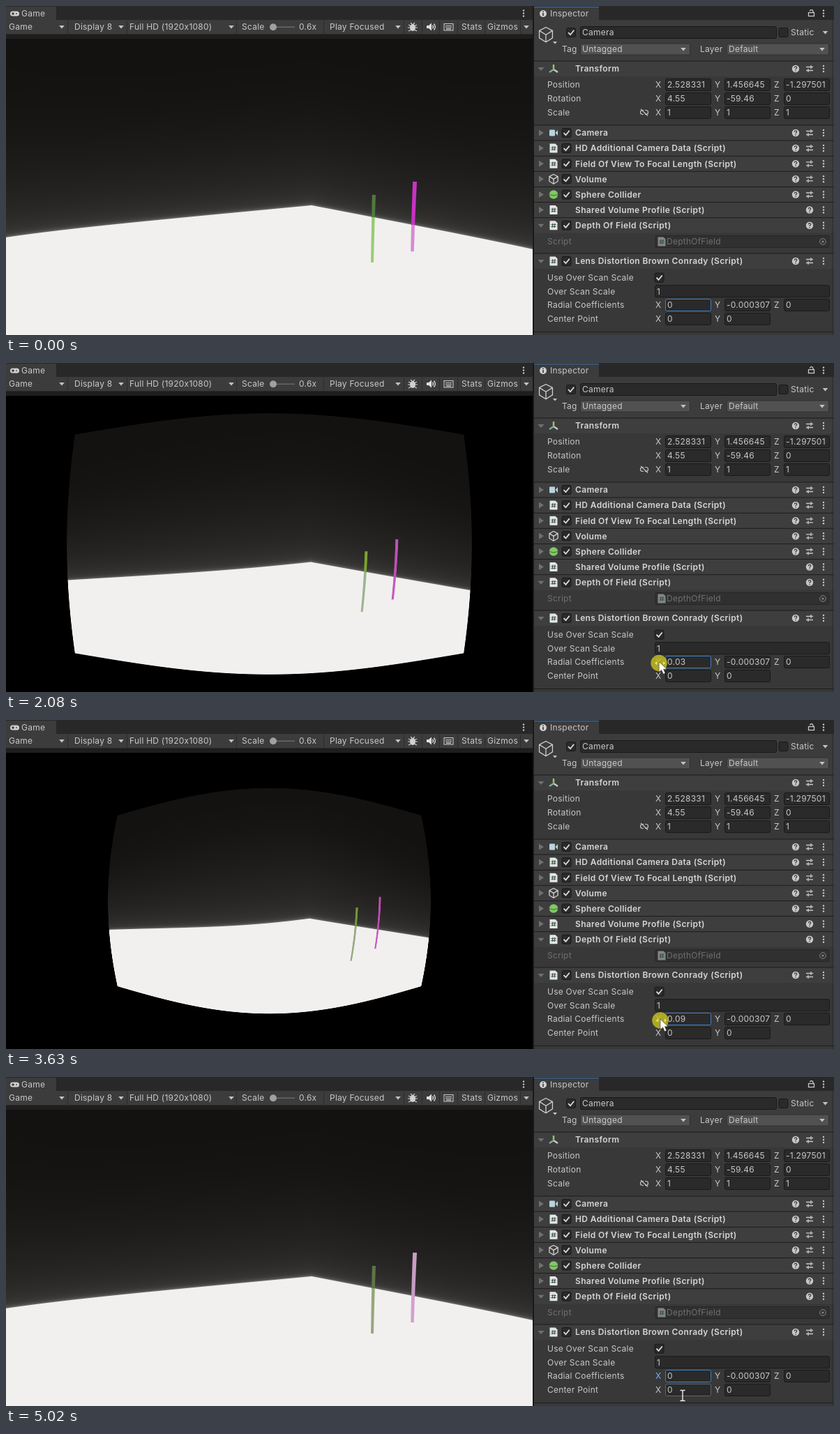
These frames come from a looping animation (1187 by 472 pixels, 5090 ms). An HTML page with a canvas:

```html
<!DOCTYPE html>
<html lang="en">
<head>
<meta charset="utf-8">
<title>Lens distortion inspector</title>
<style>
html, body { margin: 0; width: 100%; height: 100%; overflow: hidden; background: #383838; }
canvas, #ui { position: absolute; left: 0; top: 0; }
canvas { top: 47px; }
text { font: 12px Inter, sans-serif; letter-spacing: .24px; fill: #c8c8c8; white-space: pre; }
.bold { font-weight: 600; letter-spacing: .36px; fill: #d6d6d6; }
.dim { fill: #707070; }
</style>
</head>
<body>
<canvas id="view" width="755" height="425"></canvas>
<svg id="ui" width="1187" height="472"></svg>
<script>
const ui = document.getElementById('ui');
const view = document.getElementById('view').getContext('2d');
const parts = [];
const add = s => parts.push(s);

const rect = (x, y, w, h, fill, extra = '') =>
  add(`<rect x="${x}" y="${y}" width="${w}" height="${h}" fill="${fill}" ${extra}/>`);
const path = (d, stroke = '#c4c4c4', width = 1.2, fill = 'none') =>
  add(`<path d="${d}" stroke="${stroke}" stroke-width="${width}" fill="${fill}"/>`);
const disc = (x, y, r, fill, extra = '') =>
  add(`<circle cx="${x}" cy="${y}" r="${r}" fill="${fill}" ${extra}/>`);
const text = (x, y, s, cls = '', id = '') =>
  add(`<text x="${x}" y="${y + 4.4}" class="${cls}" id="${id}">${s}</text>`);
const down = (x, y, c = '#c4c4c4', r = 3.8) =>
  path(`M${x - r} ${y - 2}h${2 * r}l${-r} ${r + .6}z`, 'none', 0, c);
const right = (x, y) => path(`M${x - 3} ${y - 4.5}l7 4.5l-7 4.5z`, 'none', 0, '#707070');
const kebab = (x, y) => [-4, 0, 4].forEach(d => disc(x, y + d, 1.2, '#c8c8c8'));

function field(x, y, w, value, id = '') {
  rect(x + .5, y - 8.5, w - 1, 17, '#2a2a2a', `rx="2" stroke="#191919" id="${id}"`);
  add(`<svg x="${x}" y="${y - 9}" width="${w - 1}" height="18">`);
  text(3, 9, value, '', id && id + 'Text');
  add('</svg>');
}
function vector(y, label, values, ids = []) {
  text(776, y, label);
  values.forEach((v, i) => {
    text(931 + 85 * i, y, 'XYZ'[i], '', ids[i] ? ids[i] + 'Label' : '');
    field(945 + 85 * i, y, 66, v, ids[i]);
  });
}
function check(x, y, on = true) {
  rect(x - 6.5, y - 6.5, 13, 13, '#2a2a2a', 'rx="2" stroke="#191919"');
  if (on) path(`M${x - 4} ${y}l3 3.2l5.2 -6.4`, '#dedede', 1.8);
}
function dropdown(x, y, w, label) {
  rect(x + .5, y - 8, w, 16, '#515151', 'rx="2" stroke="#303030"');
  text(x + 3, y, label);
  down(x + w - 9, y);
}
function cube(x, y, r) {
  const h = r * .55;
  path(`M${x} ${y - r}l${r * .9} ${h * .85}v${r}l${-r * .9} ${h}l${-r * .9} ${-h}v${-r}z` +
    `M${x - r * .9} ${y - r + h * .85}l${r * .9} ${h}l${r * .9} ${-h}M${x} ${y - r + h * 1.85}v${r}`, '#d0d0d0', 1.3);
}
function script(x, y, fill = '#e6e6e6') {
  path(`M${x - 5.5} ${y - 6.5}h8l3 3v10h-11z`, 'none', 0, fill);
  path(`M${x - 1} ${y - 3}l-1 6.5M${x + 2} ${y - 3}l-1 6.5M${x - 3.5} ${y - 1}h7M${x - 3.5} ${y + 1.8}h7`, '#31533a', 1);
}
const icons = {
  script,
  axes(x, y) {
    path(`M${x} ${y - 6}v6`, '#8fd05c', 2.4);
    path(`M${x} ${y + 1}l-6 4`, '#7fae9c', 2.2);
    path(`M${x} ${y + 1}l6 4`, '#c8c8c8', 2.2);
  },
  camera(x, y) {
    rect(x - 6, y - 4.5, 8, 9, '#b9d3dc', 'rx="1"');
    path(`M${x + 2.5} ${y}l3.5 -4v8z`, 'none', 0, '#b9d3dc');
  },
  volume(x, y) { cube(x, y, 6.8); },
  ball(x, y) {
    disc(x, y, 6.2, '#82c866');
    path(`M${x - 6} ${y}q6 3 12 0`, '#3c6a2e', 1);
  }
};
function help(x, y) {
  disc(x, y, 5.2, '#c8c8c8');
  path(`M${x - 1.8} ${y - 1.3}q.2 -1.8 1.9 -1.8q1.8 .2 1.7 1.7q-.2 1 -1.7 1.6v1M${x} ${y + 2.3}v1.4`, '#3a3a3a', 1.2);
}
function header(y, icon, title, { open, box = true, sliders = true } = {}) {
  rect(757, y - 11, 430, 22, '#3e3e3e');
  rect(757, y - 11.5, 430, 1, '#1c1c1c');
  open ? down(767, y, '#707070', 4.5) : right(767, y);
  icons[icon](785, y);
  if (box) check(803.5, y);
  text(816, y, title, 'bold');
  help(sliders ? 1132 : 1152, y);
  if (sliders) path(`M1147 ${y - 2.5}h10M1147 ${y + 2.5}h10M1154 ${y - 5}v5M1150 ${y}v5`, '#c8c8c8', 1.3);
  kebab(1172, y);
}

function gameBar() {
  rect(0, 0, 755, 47, '#282828');
  rect(0, 1, 72, 20, '#3c3c3c');
  rect(0, 20, 755, 20.5, '#3c3c3c');
  rect(0, 40.5, 755, 6.5, '#1e1e1e');
  rect(6, 7.5, 13, 7, '#d0d0d0', 'rx="3.5"');
  path('M8 11h4M10 9v4M15 10v2', '#3c3c3c', 1.3);
  text(22, 11, 'Game');
  kebab(742, 10.5);
  for (const x of [88, 173, 330, 455, 570, 596, 621, 647, 686, 737]) rect(x, 21, 1, 19, '#2c2c2c');
  [[4, 'Game'], [98, 'Display 8'], [177, 'Full HD (1920x1080)'], [338, 'Scale'], [420, '0.6x'],
   [464, 'Play Focused'], [653, 'Stats'], [690, 'Gizmos']].forEach(([x, s]) => text(x, 30, s));
  [80, 165, 323, 562, 746].forEach(x => down(x, 30));
  rect(382, 29.5, 32, 1.5, '#686868');
  disc(383, 30.3, 5, '#a0a0a0');
  add('<ellipse cx="583" cy="31" rx="4" ry="5" fill="#d0d0d0"/>');
  path('M577 27l4 2M589 27l-4 2M576 31h14M577 36l4 -2M589 36l-4 -2M580 24l3 3l3 -3', '#d0d0d0', 1.2);
  path('M603 28h3l4 -3.5v11l-4 -3.5h-3z', 'none', 0, '#e0e0e0');
  path('M611.5 27.5q2 2.5 0 5M613.5 25.5q3.6 4.5 0 9', '#e0e0e0', 1.3);
  rect(628, 25.5, 13, 9.5, 'none', 'stroke="#d0d0d0"');
  path('M630 28.5h9M630 31h9M631 33.2h7', '#d0d0d0', 1.2);
  rect(755, 0, 2, 472, '#191919');
}

function inspector() {
  rect(757, 0, 430, 472, '#383838');
  rect(757, 0, 430, 20, '#282828');
  rect(757, 1, 93, 20, '#3c3c3c');
  rect(757, 1, 93, 1, '#3a72b0');
  rect(757, 20, 430, 58, '#3c3c3c');
  disc(770, 11, 5, '#d0d0d0');
  path('M770 7.4v1.6M770 10v4', '#333', 1.6);
  text(780, 11, 'Inspector');
  rect(1150.5, 9.5, 8, 5, 'none', 'stroke="#c8c8c8" stroke-width="1.3"');
  path('M1157 9v-1.5q-.3 -2 -2.3 -2t-2.3 2', '#c8c8c8', 1.3);
  kebab(1172, 10.5);

  cube(774, 41, 10.5);
  down(787, 53, '#c4c4c4', 3);
  check(810, 38);
  field(823, 38, 282, 'Camera');
  check(1114.5, 38, false);
  text(1125, 38, 'Static');
  down(1174.5, 38);
  text(797, 62, 'Tag');
  dropdown(823, 62, 157, 'Untagged');
  text(995, 62, 'Layer');
  dropdown(1033, 62, 146, 'Default');

  header(90, 'axes', 'Transform', { open: true, box: false });
  vector(113, 'Position', ['2.528331', '1.456645', '-1.297501']);
  vector(133, 'Rotation', ['4.55', '-59.46', '0']);
  vector(153, 'Scale', ['1', '1', '1']);
  path('M914 149.5h-1.5a3 3 0 0 0 0 6h1.5M916 149.5h1.5a3 3 0 0 1 0 6h-1.5M910 148l10 9.5', '#c4c4c4', 1.2);

  header(182, 'camera', 'Camera');
  header(204, 'script', 'HD Additional Camera Data (Script)');
  header(226.3, 'script', 'Field Of View To Focal Length (Script)');
  header(248.3, 'volume', 'Volume');
  header(270.5, 'ball', 'Sphere Collider');
  header(292.5, 'script', 'Shared Volume Profile (Script)', { box: false, sliders: false });
  header(314.7, 'script', 'Depth Of Field (Script)', { open: true, sliders: false });
  text(776, 338, 'Script', 'dim');
  rect(931, 329.5, 249, 17, '#303030', 'rx="2" stroke="#262626"');
  script(940, 338, '#858585');
  text(947, 338, 'DepthOfField', 'dim');
  disc(1171, 338, 4.3, 'none', 'stroke="#858585"');
  disc(1171, 338, 1.6, '#858585');

  header(366, 'script', 'Lens Distortion Brown Conrady (Script)', { open: true });
  text(776, 389.7, 'Use Over Scan Scale');
  check(936.5, 389.7);
  text(776, 409.3, 'Over Scan Scale');
  field(930, 409.3, 251, '1');
  vector(429, 'Radial Coefficients', ['0', '-0.000307', '0'], ['radial']);
  vector(449, 'Center Point', ['0', '0'], ['center']);
  rect(757, 467, 430, 1, '#1c1c1c');
  rect(1184.5, 20, 1, 452, '#2b2b2b');
}

gameBar();
inspector();
add(`<g id="pointer"><circle id="press" cx="0" cy="1" r="11.8" fill="#d2c81e" fill-opacity=".77"/>
  <g id="arrow"><path id="slide" d="M-3 -1.5v5l-3 -2.5zM6 -1.5v5l3 -2.5z" fill="#eeee66"/>
  <path d="M0 -1v15l3.6 -3.2l2.6 6l2.8 -1.2l-2.6 -5.8h4.8z" fill="#fff" stroke="#333" stroke-width=".6"/></g>
  <path id="beam" d="M-3.5 -7.5h2.5l1 1l1 -1h2.5M0 -6.5v13M-3.5 7.5h2.5l1 -1l1 1h2.5" stroke="#eee" stroke-width="1.4" fill="none"/></g>`);
ui.innerHTML = parts.join('');
const $ = id => document.getElementById(id);

// Brown-Conrady model: undistorted = distorted * (1 + K1 r^2 + K2 r^4)
const UNIT = 1.345e-4, K2 = -0.000307, HALF_W = 377.5, HALF_H = 212.5;
const clamp = v => Math.max(0, Math.min(1, v));
const mix = (a, b, f) => a.map((v, i) => v + (b[i] - v) * f);
const rgb = hex => [16, 8, 0].map(s => hex >> s & 255);
const FLOOR = rgb(0xf1f0ef);
const poles = [
  { x0: 149.5, y0: 11.5, x1: 146.6, y1: 107.8, w: 2.5 },
  { x0: 206.4, y0: -7.4, x1: 202.1, y1: 91.3, w: 2.8 }
];
// [time, green above / below the horizon, pink above / below]
const tints = [
  [0, 0x4f7a3f, 0x98cc74, 0xc832c4, 0xd68ad2],
  [1870, 0x7ba32f, 0x9cb490, 0xc050b8, 0xc958c2],
  [2430, 0x2f8f2f, 0x9fae9a, 0xcac5c6, 0xc9cdc4],
  [3560, 0x6f9a35, 0x94ad80, 0xc24bbb, 0xc85cc2],
  [4190, 0x58b03a, 0x98c67c, 0xd040c8, 0xc850c0],
  [4820, 0x5f7448, 0x98a67c, 0xc79cc4, 0xd4a0cf]
];

function shade(x, y, m, tint) {
  const depth = (y - 26.5 - (x < 60.5 ? .0948 * (60.5 - x) : .1918 * (x - 60.5))) / m;
  const up = Math.max(0, -depth * m);
  const base = 19 + 28 * clamp(1 - up / 245) ** 2.2 + 14 * Math.exp(-up / 14) + 55 * Math.exp(-up / 2.2);
  let c = mix([base + 1, base - 1, base - 3], FLOOR, clamp(depth + .5));
  poles.forEach((p, i) => {
    if (Math.abs(x - p.x0) > 12) return;
    const f = (y - p.y0) / (p.y1 - p.y0);
    const side = p.w * (1 - .25 * f) - Math.abs(x - p.x0 - f * (p.x1 - p.x0));
    const cover = clamp(Math.min(side, y - p.y0, p.y1 - y) / m + .5);
    if (cover) c = mix(c, tint[2 * i + (depth > 0 ? 1 : 0)], cover);
  });
  return c;
}

function render(k, tint) {
  const img = view.createImageData(755, 425);
  for (let j = 0, o = 0; j < 425; j++) for (let i = 0; i < 755; i++, o += 4) {
    const dx = i + .5 - HALF_W, dy = j + .5 - HALF_H;
    const r2 = (dx * dx + dy * dy) * UNIT;
    const m = 1 + k * r2 + K2 * r2 * r2;
    const x = dx * m, y = dy * m;
    const inside = clamp(Math.min(HALF_W - Math.abs(x), HALF_H - Math.abs(y)) / m + .5);
    img.data[o + 3] = 255;
    if (inside) shade(x, y, m, tint).forEach((v, n) => img.data[o + n] = v * inside);
  }
  view.putImageData(img, 0, 0);
}

const coefficients = [[0, 0], [1870, .01], [2010, .02], [2080, .03], [2150, .04], [2220, .06], [2290, .09],
  [2360, .12], [2430, .15], [3560, .12], [3630, .09], [3770, .08], [3840, .06], [4190, .03], [4260, .01], [4330, 0]];
const track = [[130, 1010, 471], [410, 976, 453], [620, 955, 441], [970, 930, 430], [1660, 930.5, 430],
  [1860, 933, 430], [2080, 936, 429.5], [2430, 940, 430], [3400, 940, 430], [3420, 941, 431], [3630, 938, 430],
  [3840, 937, 430], [4190, 936, 430], [4330, 935, 430], [4750, 935, 430], [4820, 946, 440], [5020, 970, 457]];
const latest = (rows, t) => rows.filter(r => r[0] <= t).pop();

function position(t) {
  const a = latest(track, t), b = track.find(r => r[0] > t);
  return b ? mix(a, b, (t - a[0]) / (b[0] - a[0])).slice(1) : a.slice(1);
}

const show = (id, on) => $(id).setAttribute('visibility', on ? 'visible' : 'hidden');
const LEAD = 20; // makes up for the delay before the first painted frame
let drawn = '', start;

function frame(now) {
  start ??= now - LEAD;
  const time = (now - start) % 5090;
  const t = time < 130 ? 0 : 130 + Math.floor((time - 130) / 70) * 70;
  const k = latest(coefficients, t)[1], tint = latest(tints, t);
  const key = k + '/' + tint[0];
  if (key !== drawn) {
    drawn = key;
    render(k, tint.slice(1).map(rgb));
    $('radialText').textContent = k;
  }
  const [x, y] = t ? position(t) : [0, 0];
  const sliding = x < 945;
  $('pointer').setAttribute('transform', `translate(${x} ${y})`);
  show('press', t >= 1170 && t < 4820);
  show('arrow', t && sliding);
  show('beam', t && !sliding);
  const hover = !sliding && x < 1011 && y > 440 && y < 458;
  $('radial').setAttribute('stroke', '#3f7fc4');
  $('center').setAttribute('stroke', hover ? '#656565' : '#191919');
  $('radialLabel').style.fill = t >= 1170 ? '#7baefa' : '';
  requestAnimationFrame(frame);
}
requestAnimationFrame(frame);
</script>
</body>
</html>
```
